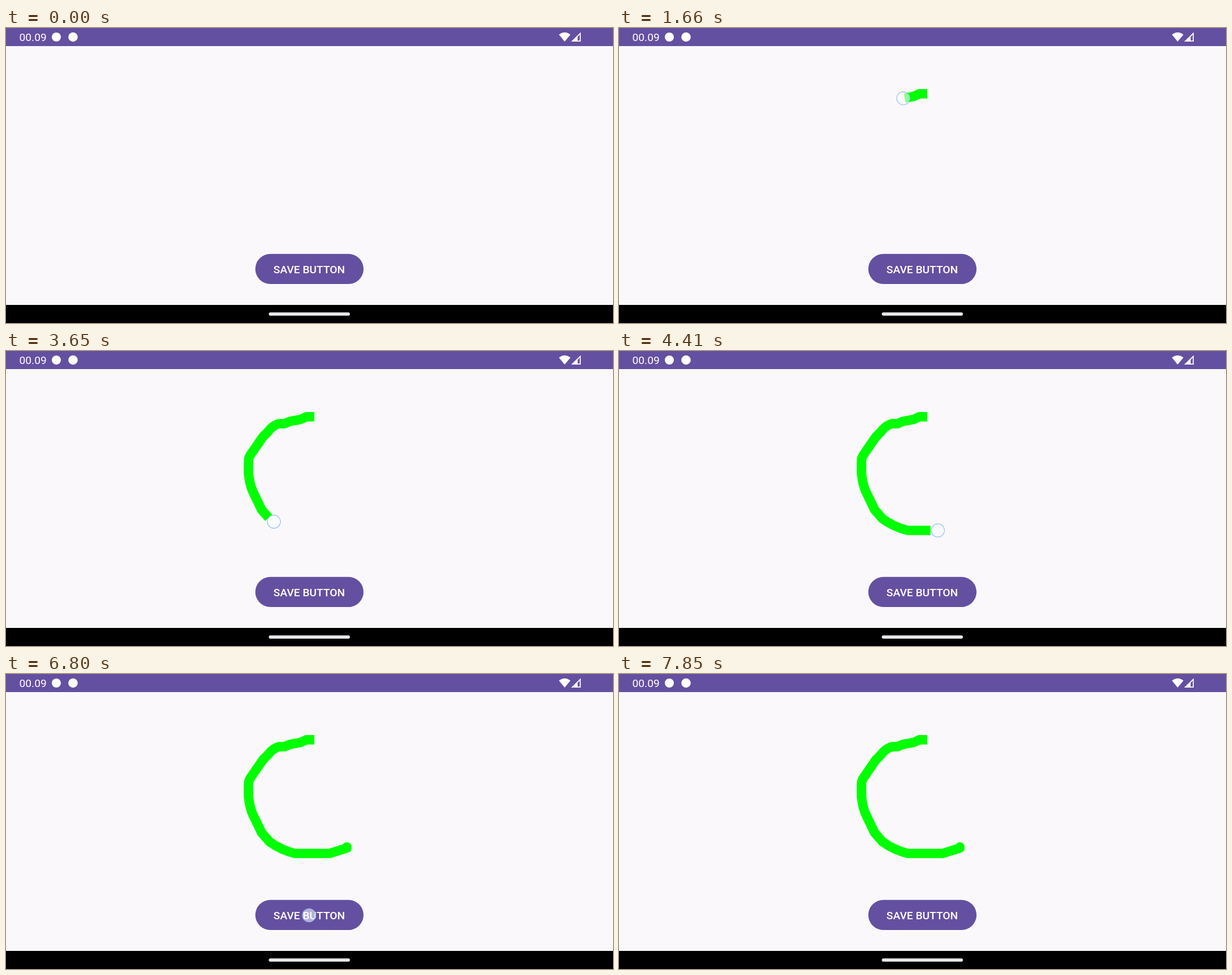
Write an HTML page that moves like this. It is 1073 by 522 pixels and loops after 8000 ms.

```html
<!DOCTYPE html>
<html lang="en">
<head>
<meta charset="utf-8">
<title>Signature pad</title>
<style>
html, body { margin: 0; width: 100%; height: 100%; overflow: hidden; background: #faf8fb; }
svg { display: block; width: 1073px; height: 522px; }
text { font-family: Roboto, sans-serif; font-size: 19.2px; fill: #fff; }
</style>
</head>
<body>
<svg viewBox="0 0 1073 522">
  <defs><clipPath id="pill"><rect x="440.7" y="399.7" width="191.3" height="53.4" rx="26.7"/></clipPath></defs>
  <rect width="1073" height="522" fill="#faf8fb"/>

  <rect width="1073" height="32" fill="#6450a0"/>
  <text x="23.5" y="23.3" font-size="19">00.09</text>
  <g fill="#fff">
    <circle cx="89" cy="16" r="8"/>
    <circle cx="118.5" cy="16" r="8.3"/>
    <path d="M987.5 24 977.5 11.8Q987.5 3.6 997.7 11.8Z"/>
    <path fill-rule="evenodd" d="M999 24 1016 7.5V24ZM1010.5 22.2H1014.3V11.8L1010.5 15.5Z"/>
  </g>

  <path id="ink" fill="none" stroke="#0f0" stroke-width="16.7" stroke-linejoin="round"
    d="M545 116.4H531L521 121 502 124.5 492 128.7H482Q470 133 463 143L454 152 432 184Q428.7 189 428.7 195V217Q431 238 437 250L452 281 466 297Q487 312 511 317.5H572L602.5 308v-2v2"/>

  <g clip-path="url(#pill)">
    <rect x="440" y="399" width="193" height="55" fill="#6450a0"/>
    <circle id="ripple" cx="535.7" cy="427" fill="#fff"/>
  </g>
  <text x="536" y="433.6" text-anchor="middle" font-weight="500">SAVE BUTTON</text>

  <rect y="490" width="1073" height="32" fill="#000"/>
  <rect x="464.5" y="503.2" width="143.5" height="5.8" rx="2.9" fill="#e7e6ea"/>

  <circle id="finger" r="11.6" fill="#f8fbff" fill-opacity=".56" stroke="#94bdec" stroke-width="1.2"/>
</svg>
<script>
const LOOP = 8000, LAG = 70;
const DOWN = 500, UP = 5250, PRESS = 6800, RELEASE = 7630, FADED = 7850;
const [ink, ripple, finger] = ['ink', 'ripple', 'finger'].map(id => document.getElementById(id));
const total = ink.getTotalLength();

// strokes of the finger: start, end, share of the path reached
const moves = [
  [780, 1520, 0.1], [1620, 2360, 0.215], [2460, 3230, 0.51],
  [3270, 3650, 0.665], [3650, 4070, 0.75], [4100, 4570, 0.965], [4870, 5180, 1]
];

const clamp = v => Math.max(0, Math.min(1, v));
const progress = (t, from, to) => clamp((t - from) / (to - from));

function travelled(t) {
  let share = 0;
  for (const [from, to, end] of moves) share += (end - share) * progress(t, from, to) * (t > from);
  return share * total;
}

function draw(t) {
  ink.setAttribute('stroke-dasharray', `${travelled(t - LAG)} ${total + 9}`);
  ink.setAttribute('visibility', t - LAG > moves[0][0] ? 'visible' : 'hidden');

  const pressing = t >= PRESS && t < RELEASE;
  const touching = t >= DOWN && t < UP || pressing;
  const spot = pressing ? { x: 535.7, y: 427 } : ink.getPointAtLength(travelled(t));
  finger.setAttribute('cx', spot.x);
  finger.setAttribute('cy', spot.y);
  finger.setAttribute('visibility', touching ? 'visible' : 'hidden');

  const grow = progress(t, PRESS, PRESS + 450);
  const fade = 1 - progress(t, RELEASE, FADED);
  ripple.setAttribute('r', 30 + 70 * (1 - (1 - grow) ** 2));
  ripple.setAttribute('opacity', 0.12 * progress(t, PRESS, PRESS + 120) * fade);
}

const start = performance.now();
function tick() {
  draw((performance.now() - start) % LOOP);
  requestAnimationFrame(tick);
}
tick();
</script>
</body>
</html>
```
